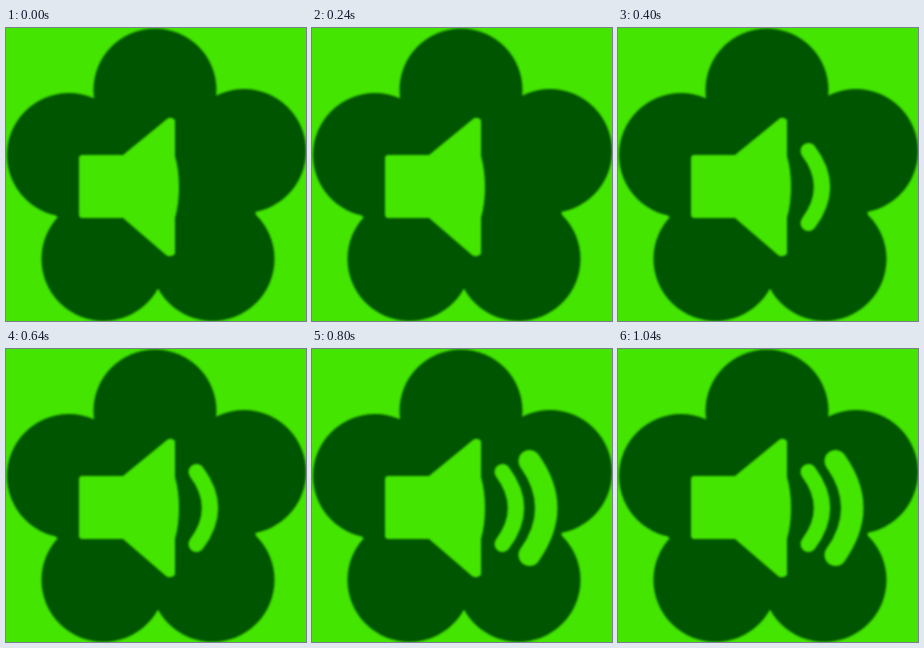
Recreate the animation shown at these times as an HTML page. Size 300x293 px, loop 1.2 s.

```html
<!DOCTYPE html>
<html lang="en">
<head>
<meta charset="utf-8">
<title>Speaker volume</title>
<style>
  html, body { margin: 0; width: 100%; height: 100%; overflow: hidden; background: #44e500; }
  svg { display: block; width: 100%; height: 100%; filter: blur(1.1px); }
  .wave { fill: none; stroke: #44e500; stroke-linecap: round; visibility: hidden; }
</style>
</head>
<body>
<svg viewBox="0 0 300 293">
  <g fill="#005500">
    <circle cx="149" cy="62" r="61.5"/>
    <circle cx="63" cy="127" r="62"/>
    <circle cx="238" cy="123" r="62"/>
    <circle cx="97.5" cy="231" r="62"/>
    <circle cx="206.5" cy="231" r="62"/>
    <path d="M88 71 211 69 250 186 152 261 50 188Z"/>
  </g>
  <path fill="#44e500" d="M73 129 75 127H117L161 91Q165 88 169 92L169 128Q173 142 173 159Q173 176 169 190L169 226Q164 230 160 227L117 190H75L73 188Z"/>
  <path class="wave" stroke-width="16" d="M190.500 123Q217.500 159 190.500 195"/>
  <path class="wave" stroke-width="22" d="M217.500 112Q251 159 217.500 206"/>
</svg>
<script>
  const STEP = 400;
  const waves = document.querySelectorAll(".wave");

  function draw(now) {
    const shown = Math.floor(now / STEP) % (waves.length + 1);
    waves.forEach((wave, i) => {
      wave.style.visibility = i < shown ? "visible" : "hidden";
    });
  }

  const start = performance.now();
  function tick() {
    draw(performance.now() - start);
    requestAnimationFrame(tick);
  }
  tick();
</script>
</body>
</html>
```
